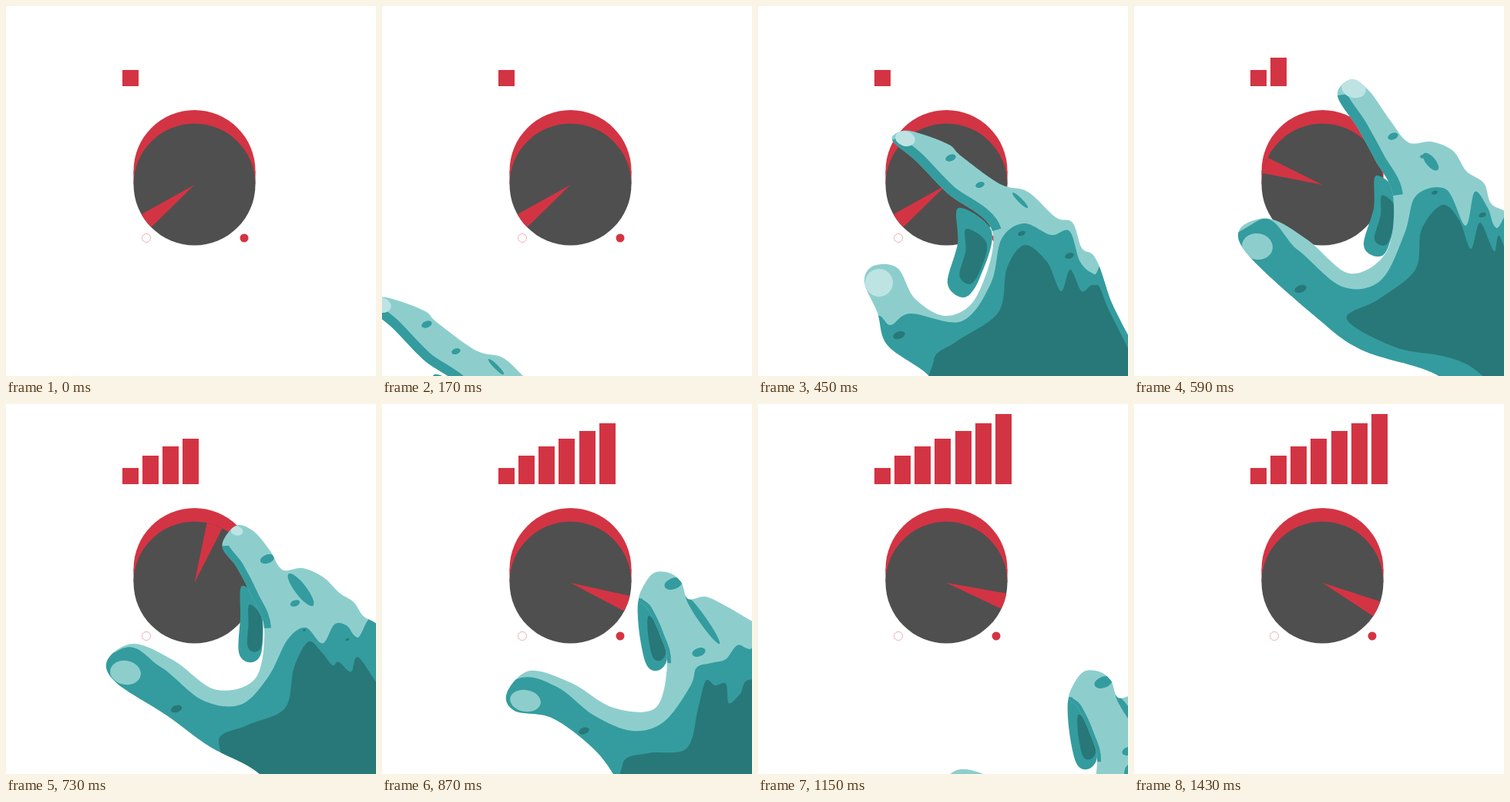
Recreate the animation shown at these times as an HTML page with a canvas. Size 480 by 480 pixels, loop 2430 ms.

```html
<!DOCTYPE html>
<html>
<head>
<meta charset="utf-8">
<style>
html, body { margin: 0; height: 100%; overflow: hidden; background: #fff; }
canvas { display: block; width: 100vw; height: 100vh; }
</style>
</head>
<body>
<canvas id="c" width="480" height="480"></canvas>
<script>
const g = document.getElementById('c').getContext('2d');
const RED = '#d33443', GRAY = '#4f4f4f', LIGHT = '#8dcecd', TEAL = '#349c9e', DARK = '#287879', NAIL = '#bde4e3';
const LOOP = 2430, STEP = 70, FIRST = 100, LAST = 1430;

// Key points of each part in three poses: reaching, gripping, letting go
const poses = (...p) => p.map(s => s.trim().split(/[\s,]+/).map(Number));

const outline = poses(
  `174,174 188,162 212,166 248,180 264,195 314,231 350,241 386,274 408,281 420,314 437,326 455,375 500,530
   250,520 220,478 168,440 155,398 138,358 150,337 181,340 204,380 245,402 284,376 304,292 246,243 205,201`,
  `264,116 282,95 305,110 332,148 356,177 386,176 414,188 431,214 454,230 463,256 484,268 530,300 540,530
   450,530 392,478 295,446 232,400 150,325 137,290 176,276 226,304 280,347 328,318 336,246 313,200 290,158`,
  `333,252 350,221 372,219 388,231 397,253 420,250 446,262 470,276 484,284 500,294 515,303 545,330 550,540
   330,540 300,480 270,443 220,407 172,398 162,375 192,346 246,362 300,394 355,394 370,336 360,298 345,266`);
const palm = poses(
  '460,356 436,348 418,332 404,292 380,297 345,282 316,302 302,360 264,409 198,399 172,414 150,408 110,520 540,640',
  '500,290 470,288 459,262 442,241 430,285 405,238 366,246 351,295 320,356 270,364 212,316 158,280 60,420 540,640',
  '505,311 478,318 461,313 446,331 427,336 408,342 400,366 366,412 325,424 275,404 225,366 172,358 100,420 540,640');
const shadow = poses(
  '228,460 258,435 312,397 323,340 346,310 375,332 393,370 405,342 420,370 435,362 450,382 490,530 245,520',
  '276,406 318,380 365,342 373,290 400,258 422,278 437,315 449,281 467,318 480,312 540,540 430,464 340,443',
  '312,468 345,453 395,447 410,395 420,359 432,365 446,363 450,388 464,377 482,358 560,400 520,560 325,540');
const backFinger = poses(
  '260,262 259,308 246,360 268,378 288,352 303,292',
  '314,220 311,262 298,310 315,325 330,312 343,248',
  '334,252 333,290 343,338 360,345 370,325 354,275');
const underWidth = poses('24', '26', '10');

// Ovals: x, y, radius
const thumbNail = poses('157,359,18', '160,312,20', '186,385,20');
const indexNail = poses('191,172,13', '285,107,16', '350,222,0');
const crease = poses('340,252,14', '385,202,14', '416,280,38');
const freckles = [
  [TEAL, poses('250,197,7', '336,169,7', '378,233,12')],
  [TEAL, poses('288,232,6', '375,195,4', '411,322,9')],
  [DARK, poses('342,295,5', '390,242,4', '420,345,0')],
  [DARK, poses('404,324,6', '452,271,5', '470,340,0')],
  [DARK, poses('183,427,8', '216,367,8', '262,424,7')]
];

const mix = (a, b, k) => a + (b - a) * k;
const rad = d => d * Math.PI / 180;

function keyed(t, keys) {
  let i = 1;
  while (i < keys.length - 1 && t > keys[i][0]) i++;
  const [t0, a] = keys[i - 1], [t1, b] = keys[i];
  return mix(a, b, Math.min(1, Math.max(0, (t - t0) / (t1 - t0))));
}

function morph(set, p) {
  const i = Math.min(1, Math.floor(p));
  return set[i].map((v, j) => mix(v, set[i + 1][j], p - i));
}

// Smooth curve through the points of a closed ring, from the given point on
function curve(v, from = 0) {
  const n = v.length / 2;
  const at = i => [v[i % n * 2], v[i % n * 2 + 1]];
  const path = new Path2D();
  path.moveTo(...at(from));
  for (let i = from; i < n; i++) {
    const [a, b, c, d] = [i + n - 1, i, i + 1, i + 2].map(at);
    path.bezierCurveTo(
      b[0] + (c[0] - a[0]) / 6, b[1] + (c[1] - a[1]) / 6,
      c[0] - (d[0] - b[0]) / 6, c[1] - (d[1] - b[1]) / 6, ...c);
  }
  return path;
}

// Copy of a shape shrunk towards a point beside its centre
function inset(v, scale, dx, dy) {
  const n = v.length / 2, sum = [0, 0];
  v.forEach((x, i) => sum[i % 2] += x);
  const mid = [sum[0] / n + dx, sum[1] / n + dy];
  return v.map((x, i) => mid[i % 2] + (x - sum[i % 2] / n) * scale);
}

function fill(path, color) {
  g.fillStyle = color;
  g.fill(path);
}

function oval([x, y, r], color, flat = 1, tilt = 0) {
  const path = new Path2D();
  path.ellipse(x, y, r, r * flat, rad(tilt), 0, 7);
  fill(path, color);
}

function drawBars(t) {
  const count = Math.min(7, Math.max(1, Math.floor((t - 520) / STEP) + 1));
  g.fillStyle = RED;
  [21, 37, 49, 59, 69, 79, 91].slice(0, count).forEach((h, i) =>
    g.fillRect(Math.floor(151 + i * 26.3), 104, 21, -h));
}

function drawDial(t) {
  oval([244.5, 214, 79], RED);
  g.fillRect(165.5, 214, 158, 17);
  oval([244.5, 231.5, 79], GRAY);
  const mid = keyed(t, [[450, 143], [590, 198.4], [870, 380.5], [1150, 378], [1430, 386]]);
  g.fillStyle = RED;
  g.beginPath();
  g.moveTo(244.5, 232);
  g.arc(244.5, 231.5, 79, rad(mid - 7.7), rad(mid + 7.7));
  g.fill();
  oval([309, 301, 5.5], RED);
  g.strokeStyle = RED;
  g.lineWidth = 0.8;
  g.setLineDash([1, 1]);
  g.beginPath();
  g.arc(182, 301, 5.5, 0, 7);
  g.stroke();
  g.setLineDash([]);
}

function drawHand(t) {
  const p = keyed(t, [[450, 0], [590, 1], [870, 2]]);
  const come = Math.max(0, (450 - t) / 140);
  const leave = Math.max(0, (t - 870) / 280) ** 1.2;
  const sway = p > 1 ? -18 * Math.sin(Math.PI * (p - 1)) : 0;
  const back = morph(backFinger, p), ring = morph(outline, p), skin = curve(ring);
  g.save();
  g.translate(-96 * come + 70 * leave + sway, 108 * come + 128 * leave);
  fill(curve(back), TEAL);
  fill(curve(inset(back, 0.62, 6, 3)), DARK);
  fill(skin, LIGHT);
  g.clip(skin);
  g.strokeStyle = TEAL;
  g.lineWidth = morph(underWidth, p)[0];
  g.stroke(curve(ring, 23));
  fill(curve(morph(palm, p)), TEAL);
  fill(curve(morph(shadow, p)), DARK);
  oval(morph(crease, p), TEAL, p < 1 ? 0.2 + 0.25 * p : 0.45 - 0.32 * (p - 1), 45 + 5 * p);
  oval(morph(thumbNail, p), p < 0.75 ? NAIL : LIGHT, mix(1, 0.7, p / 2), 10);
  oval(morph(indexNail, p), NAIL, 0.75, 15);
  for (const [color, set] of freckles) oval(morph(set, p), color, 0.6, -20);
  g.restore();
}

const start = performance.now();
function frame() {
  const now = (performance.now() - start) % LOOP;
  const t = now < FIRST ? 0 : Math.min(LAST, FIRST + Math.floor((now - FIRST) / STEP) * STEP);
  g.clearRect(0, 0, 480, 480);
  drawBars(t);
  drawDial(t);
  if (t >= FIRST && t < LAST) drawHand(t);
  requestAnimationFrame(frame);
}
frame();
</script>
</body>
</html>
```
